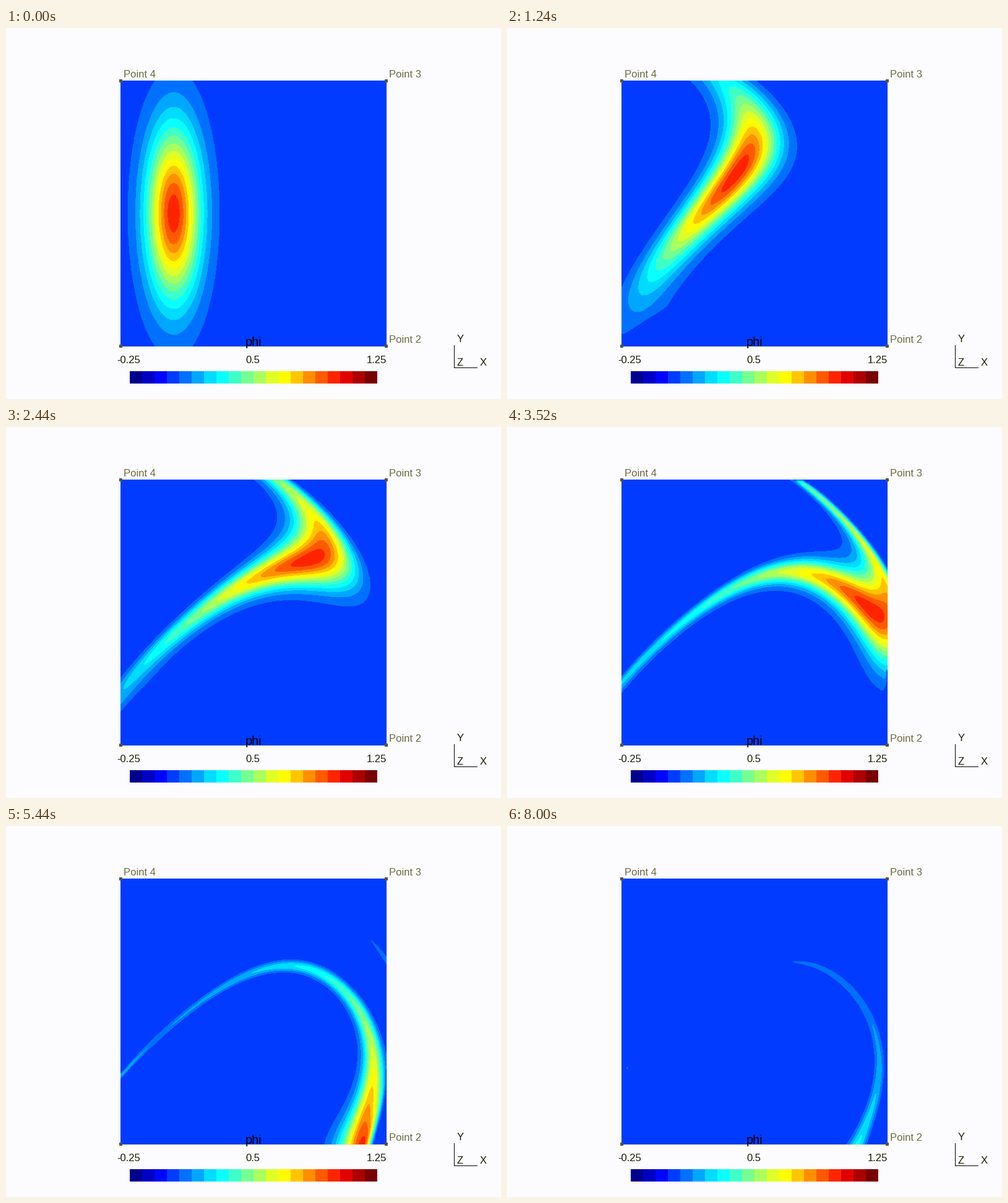
Recreate the animation shown at these times as a matplotlib script. Size 800 px wide and 600 px high, loop 8040 ms.

```python
import numpy as np
import matplotlib.pyplot as plt
from matplotlib.animation import FuncAnimation
from matplotlib.colors import ListedColormap
from matplotlib.patches import Rectangle

FRAMES, INTERVAL = 201, 40
N, SIDE = 126, 430            # solver nodes and screen pixels per side
LEFT, TOP = 185, 85
LOW, STEP, BANDS = -0.25, 0.075, 20

plt.rcParams["font.family"] = "Liberation Sans"


def jet(i):
    s = 128 * i / (BANDS - 1)
    r = min((s - 46) / 32, 1, 1 - (s - 111) / 32)
    g = min((s - 12.7) / 32, 1, (112.3 - s) / 32)
    b = min(1 + (s - 14) / 32, 1, (79 - s) / 32)
    return tuple(np.clip((r, g, b), 0, 1))


def velocity(x, y):
    """Steady flow, in box widths per frame."""
    u = (y - 0.293) * (0.0283 - 0.081 * (y - 0.45) ** 2)
    v = 0.01313 * np.cos(3 * (x - 0.3325)) - 0.00793
    return u, v


def trace_back(x, y):
    u1, v1 = velocity(x, y)
    u2, v2 = velocity(x - u1 / 2, y - v1 / 2)
    u3, v3 = velocity(x - u2 / 2, y - v2 / 2)
    u4, v4 = velocity(x - u3, y - v3)
    return x - (u1 + 2 * u2 + 2 * u3 + u4) / 6, y - (v1 + 2 * v2 + 2 * v3 + v4) / 6


def cubic(s):
    """First node and four Lagrange weights for grid positions s."""
    first = np.clip(np.floor(s).astype(int) - 1, 0, N - 4)
    d = s - first
    weights = [np.prod([(d - m) / (k - m) for m in range(4) if m != k], axis=0)
               for k in range(4)]
    return first, weights


def sampler():
    """Matrix that resamples node values at pixel centres."""
    first, weights = cubic((np.arange(SIDE) + 0.5) / SIDE * (N - 1))
    m = np.zeros((SIDE, N))
    for k in range(4):
        m[np.arange(SIDE), first + k] = weights[k]
    return m


def solve():
    axis = np.linspace(0, 1, N)
    x, y = np.meshgrid(axis, axis)
    px, py = trace_back(x, y)
    inside = (px >= 0) & (px <= 1) & (py >= 0) & (py <= 1)
    ix, wx = cubic(np.clip(px, 0, 1) * (N - 1))
    iy, wy = cubic(np.clip(py, 0, 1) * (N - 1))
    taps = [((iy + b) * N + ix + a, wx[a] * wy[b] * inside)
            for a in range(4) for b in range(4)]
    to_pixels = sampler()
    phi = np.exp(-(x - 0.2) ** 2 / 0.01 - (y - 0.5) ** 2 / 0.1)
    pictures = []
    for _ in range(FRAMES):
        fine = np.maximum(to_pixels @ phi @ to_pixels.T, -0.02)
        bands = np.clip(np.floor((fine - LOW) / STEP), 0, BANDS - 1)
        pictures.append(bands[::-1].astype(np.uint8))
        flat = phi.ravel()
        phi = np.clip(sum(flat[i] * w for i, w in taps), -0.02, 1.0)
    return pictures


pictures = solve()
colors = [jet(i) for i in range(BANDS)]

fig = plt.figure(figsize=(8, 6), dpi=100, facecolor="#fcfcfe")
ax = fig.add_axes([0, 0, 1, 1])
ax.axis("off")


def box(x, y, w, h, color, z=3):
    ax.add_patch(Rectangle((x, y), w, h, fc=color, lw=0, antialiased=False, zorder=z))


def label(x, y, text, color, ha="center", size=12):
    ax.text(x, y, text, color=color, ha=ha, va="baseline", fontsize=size, zorder=6)


OLIVE, DARK, PALE = "#6a6a40", "#1c1c04", "#f4f4a8"
RIGHT, BOTTOM = LEFT + SIDE, TOP + SIDE

image = ax.imshow(pictures[0], cmap=ListedColormap(colors), vmin=-0.5, vmax=BANDS - 0.5,
                  extent=(LEFT, RIGHT, BOTTOM, TOP), interpolation="nearest",
                  aspect="auto", zorder=2)
ax.set_xlim(0, 800)
ax.set_ylim(600, 0)

box(RIGHT, TOP, 1, SIDE, PALE)
box(LEFT, BOTTOM, SIDE, 1, PALE)
for cx in (LEFT, RIGHT - 1):
    for cy in (TOP, BOTTOM - 1):
        box(cx - 2, cy - 2, 5, 5, "#545440", 4)

label(190, 80, "Point 4", OLIVE, "left")
label(619, 80, "Point 3", OLIVE, "left")
label(619, 509, "Point 2", OLIVE, "left")

for i, c in enumerate(colors):
    box(200 + 20 * i, 555, 20, 20, c)
label(198.5, 542, "-0.25", DARK)
label(399, 542, "0.5", DARK)
label(598.5, 542, "1.25", DARK)
label(399.5, 514, "phi", "black", size=14.4)

box(724, 513, 1, 37, "black")
box(724, 549, 38, 1, "black")
label(734, 508.5, "Y", DARK)
label(771.5, 546, "X", DARK)
label(733.5, 546, "Z", DARK)


def update(i):
    image.set_data(pictures[i])
    return [image]


anim = FuncAnimation(fig, update, frames=FRAMES, interval=INTERVAL, repeat=True,
                     repeat_delay=0, blit=False)
plt.show()
```
